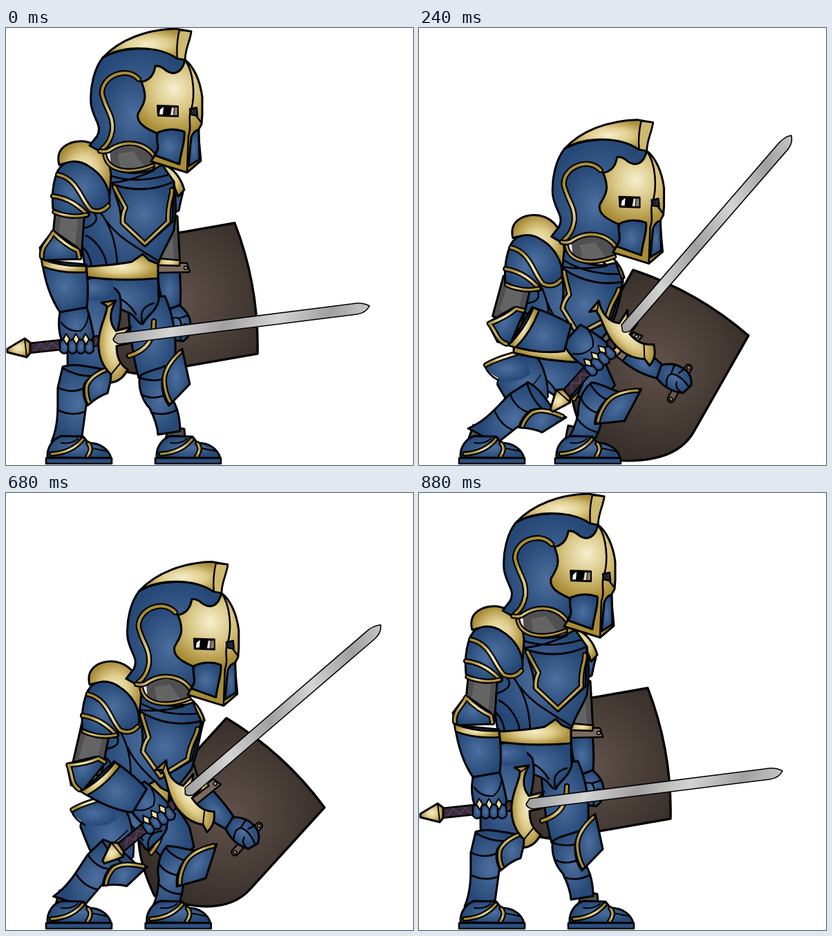
Write an HTML page that moves like this. It is 589 px wide and 632 px high and loops after 920 ms.

```html
<!DOCTYPE html>
<html lang="en">
<head>
<meta charset="utf-8">
<title>Crouching knight</title>
<style>
html, body { margin: 0; width: 100%; height: 100%; overflow: hidden; background: #fff; }
svg { display: block; width: 100vw; height: 100vh; }
path, circle { stroke-linejoin: round; stroke-linecap: round; }
</style>
</head>
<body>
<svg id="stage" viewBox="0 0 589 632">
  <defs>
    <radialGradient id="blue"><stop offset="0" stop-color="#4d6f9f"/><stop offset="1" stop-color="#264876"/></radialGradient>
    <radialGradient id="gold"><stop offset="0" stop-color="#f6eecb"/><stop offset=".5" stop-color="#dfcd8c"/><stop offset="1" stop-color="#a98c38"/></radialGradient>
    <radialGradient id="face" gradientUnits="userSpaceOnUse" cx="243" cy="88" r="64"><stop offset="0" stop-color="#f6efcd"/><stop offset=".5" stop-color="#d9c684"/><stop offset="1" stop-color="#a98c36"/></radialGradient>
    <radialGradient id="wood" gradientUnits="userSpaceOnUse" cx="96" cy="100" r="150"><stop offset="0" stop-color="#60524a"/><stop offset="1" stop-color="#352c28"/></radialGradient>
    <linearGradient id="steel" gradientUnits="userSpaceOnUse" x1="160" y1="450" x2="225" y2="474" spreadMethod="reflect"><stop offset="0" stop-color="#a0a0a0"/><stop offset="1" stop-color="#d4d4d4"/></linearGradient>
  </defs>
</svg>
<script>
const stage = document.getElementById('stage');
const BLUE = 'url(#blue)', GOLD = 'url(#gold)', GREY = '#646464', DARK = '#505050';

const fill = (d, paint, w = 3) => `<path d="${d}" fill="${paint}" stroke="#000" stroke-width="${w}"/>`;
const line = (d, w = 2.6, color = '#000') => `<path d="${d}" fill="none" stroke="${color}" stroke-width="${w}"/>`;
const trim = (d, w = 4) => line(d, w + 4.4) + line(d, w, GOLD);
const dot = (x, y, r, paint) => `<circle cx="${x}" cy="${y}" r="${r}" fill="${paint}" stroke="#000" stroke-width="1.5"/>`;

// Parts are drawn standing. In a full crouch a part has moved by (dx, dy),
// turned by `turn` about its pivot and shortened by `squash`.
// `lag` [dy, angle] holds a part back on the way down.
const parts = [];
function part(art, pivot, { dx = 0, dy = 0, turn = 0, squash = 0, lag = [0, 0] } = {}) {
  const g = document.createElementNS('http://www.w3.org/2000/svg', 'g');
  g.innerHTML = art;
  stage.append(g);
  parts.push({ g, pivot, dx, dy, turn, squash, lag });
}

// Shield, drawn with its top edge along x
const elbow = [236, 345], farArm = { dx: 65, dy: 124, turn: -52.9 };
part(`<g transform="translate(331 282) rotate(80.1)">
  ${fill('M0 0Q96-19 192 0L192 160Q192 220 96 260Q0 220 0 160Z', 'url(#wood)', 3.4)}</g>`, elbow, farArm);

// Far arm
part(fill('M222 270L248 272L252 345L222 345Z', DARK) + fill('M226 300L240 296L244 340L226 340Z', GREY, 0),
  [236, 300], { dx: 32, dy: 135, turn: -20 });
part(
  line('M222 443L273 434', 12) + line('M222 443L273 434', 7.5, '#66574f') +
  fill('M220 350L251 349C253 370 253 390 252 403L233 410C224 392 219 372 220 350Z', BLUE) +
  fill('M219 338L262 340L266 353L220 354Z', '#7b6a5f', 2.4) +
  fill('M219 333L252 336L251 344L219 343Z', GOLD, 2.4) +
  dot(260, 347, 2.5, '#aaa') + dot(273, 434, 2.2, '#aaa') + dot(222, 443, 2.2, '#aaa') +
  fill('M232 408L251 401C260 408 266 416 267 426C270 438 264 448 256 453L240 451C231 438 229 422 232 408Z', BLUE) +
  line('M233 426Q242 416 250 420Q258 430 252 452M250 420L262 416M240 451Q236 438 246 434M258 428L268 430', 2.4),
  elbow, farArm);

// Far shoulder
part(
  fill('M236 205L256 238L253 250L250 264L238 270Z', BLUE) +
  fill('M214 192C236 196 252 212 258 234L249 244C244 226 232 212 214 205Z', GOLD),
  [236, 220], { dx: 41, dy: 133 });

// Far leg
part(
  fill('M176 392L230 388C244 420 246 450 245 472L235 500L192 506C182 470 178 430 176 392Z', BLUE) +
  trim('M178 474C205 466 214 450 214 424'),
  [220, 500], { dx: 55, dy: 28, turn: -45 });

const boot =
  fill('M60 621C59 606 68 594 80 590L112 591L119 600C136 600 149 609 152 622Z', BLUE) +
  fill('M58 622L153 622L153 630L58 630Z', '#2d4f80', 2.6) +
  trim('M66 616C84 615 100 608 111 595', 3) + trim('M119 601Q126 608 118 619', 3) +
  line('M80 600Q95 602 104 594M126 608L146 612', 2);

part(fill('M235 575L258 580L260 602L230 600Z', DARK), [245, 595], { dx: -20 });
part(
  fill('M194 503C206 494 224 494 242 484L240 535C250 552 252 570 252 583L220 588C219 574 214 562 208 550C198 540 190 520 194 503Z', BLUE) +
  line('M196 530Q214 540 236 528M210 556Q230 562 248 552M194 506Q210 512 226 508') +
  fill('M255 464L266 515L236 546C228 536 225 522 226 510C227 494 240 478 255 464Z', BLUE) +
  trim('M252 469C238 482 229 496 229 510Q230 528 237 540', 3.4),
  [255, 464], { dx: 70, dy: 61, turn: 42 });
part(`<g transform="translate(158)">${boot}</g>`, [245, 595], { dx: -20 });

// Hips and near leg
const hips = { dx: 22, dy: 121, turn: 7 };
part(
  fill('M117 358L220 360L221 394C216 412 205 414 198 428C190 428 190 418 178 412L128 390Z', BLUE) +
  line('M198 428Q190 404 214 398M166 392Q180 400 188 414'),
  [165, 350], hips);
part(
  fill('M98 382C104 362 150 362 164 384C172 412 156 470 138 504L92 508C84 476 94 416 98 382Z', BLUE) +
  line('M100 448Q122 458 152 446'),
  [130, 385], { dx: 8, dy: 115, turn: -46, squash: .5 });
part(
  fill('M92 372C104 360 130 356 152 360L158 384C140 400 108 398 92 372Z', BLUE, 0) +
  line('M152 356C130 350 104 360 92 372Q98 386 112 393') + trim('M94 371C108 362 128 358 150 350', 3.4),
  [130, 372], { dx: 3, dy: 122 });
part(fill('M74 578L106 580L108 600L72 602Z', DARK), [92, 595], { turn: 15 });
part(
  fill('M82 490C98 484 122 490 142 494L116 546L110 590Q88 590 66 598C78 570 74 540 75 520Z', BLUE) +
  line('M75 520Q96 530 114 520M76 553Q96 562 114 555M82 492Q104 504 122 503') +
  fill('M157 488L147 528Q134 532 118 546C112 536 111 526 113 516C120 502 138 496 157 488Z', BLUE) +
  trim('M152 491C136 497 122 504 117 517Q115 530 120 541', 3.4),
  [92, 595], { turn: 46 });
part(boot, [92, 595]);

// Trunk and belt
part(
  fill('M146 196C168 214 200 214 226 198L243 222C247 250 246 272 243 292C236 310 226 322 220 342L115 347C108 320 108 288 112 250Z', BLUE) +
  line('M133 262C152 285 160 315 161 343M116 300C132 308 144 328 146 344M112 290Q138 282 128 268M146 280C160 300 180 312 219 336M112 318Q122 328 124 346') +
  fill('M154 226Q200 242 243 222L241 280L201 316L166 282C168 262 160 250 154 226Z', BLUE) +
  trim('M157 230C162 240 170 254 173 260Q168 270 169 282L201 312L235 280C233 254 241 245 240 234', 3.6) +
  line('M152 214Q190 226 236 212M150 224Q180 222 214 206'),
  [165, 350], { dx: 22, dy: 126, turn: 16 });
part(fill('M115 345Q158 343 182 338L198 327L207 336L220 341L220 362Q165 367 117 360Z', GOLD), [165, 350], hips);

// Near upper arm
part(
  fill('M72 258L114 260L109 332L66 318Z', DARK) + fill('M80 272L104 275L100 318L74 308Z', GREY, 0),
  [90, 290], { dx: 47, dy: 108, turn: 10 });

// Sword and the hand that holds it
const diamond = x => fill(`M${x} 442l5 8l-4 8l-5-8Z`, '#eee0a8', 2);
const finger = x => fill(`M${x} 453q6-5 12 0l1 13q-6 9-13 1Z`, BLUE, 2.4);
const each = (n, draw) => Array.from({ length: n }, (_, i) => draw(i)).join('');
part(
  fill('M33 456L136 445L138 459L34 470Z', '#3b2d33', 2.4) +
  line('M42 466L50 456L59 465L67 455L76 464L84 454L128 458L134 448', 2.4, '#4b3a68') +
  fill('M2 464L27 449L35 455L35 470L30 476L2 469Z', GOLD) + line('M27 449L30 476', 2) +
  fill('M138 397L159 394C149 412 150 427 159 438L181 432L172 442L178 456L160 460C160 478 166 487 176 494C170 506 162 512 151 513L152 501C138 488 133 470 134 452C136 428 147 414 146 402Z', GOLD) +
  line('M146 404Q150 402 159 394M152 501L166 484', 2) +
  fill('M160 442L500 399Q516 396 526 402Q521 412 508 414L164 457Q156 455 155 450Z', 'url(#steel)', 1.6) +
  fill('M79 406L116 402C121 416 125 434 127 446L121 460L84 460C76 444 75 424 79 406Z', BLUE) +
  line('M80 426Q90 440 108 438M108 438Q118 430 119 416', 2.2) +
  each(4, i => finger(78 + 12 * i)) + each(3, i => diamond(87 + 14 * i)),
  [160, 450], { dx: 145, dy: -24, turn: -46.9, lag: [29, 10] });

// Near forearm with elbow guard
part(
  fill('M68 293L104 318L108 334L54 336L49 318Z', BLUE) +
  trim('M52 331C50 316 62 310 68 296Q86 314 104 322L106 332', 3.6) +
  fill('M52 336L116 342C119 368 119 388 117 404L78 411C64 390 56 366 52 336Z', BLUE) +
  fill('M51 334Q82 346 116 344L116 353Q82 356 53 345Z', GOLD, 2.6),
  [84, 318], { dx: 46.7, dy: 109.4, turn: -68 });

// Near shoulder
part(
  fill('M75 206C68 222 66 240 68 262Q94 276 118 273L126 240Z', BLUE) +
  trim('M68 243C90 246 104 256 118 270', 3.6) + trim('M70 266Q94 276 117 270', 3) +
  fill('M77 198C70 172 94 162 114 164C138 168 150 188 152 212L150 242C136 208 108 186 77 198Z', GOLD) +
  fill('M74 211C78 192 102 188 120 200C140 212 150 232 150 248C150 262 138 269 123 265C112 240 100 218 74 211Z', BLUE) +
  trim('M75 212C104 218 108 248 123 263Q138 269 148 257', 3.6),
  [112, 215], { dx: 61, dy: 112, turn: 2 });

// Neck and helmet
part(
  fill('M150 178Q185 160 218 186L214 200Q182 212 152 200Z', DARK, 0) +
  fill('M162 182L184 178L200 200L166 204Z', GREY, 0) +
  trim('M143 184C148 208 180 212 212 199', 2.8) +
  fill('M140 43C128 58 121 85 123 110C126 132 140 140 132 156L121 170L135 178L148 180C166 162 200 160 214 188L262 206L268 100L258 46C225 24 170 26 140 43Z', BLUE) +
  fill('M196 78C176 52 136 70 138 94C143 118 156 126 153 148Q150 168 140 177L150 179C172 160 200 162 214 186L232 150L212 76Z', BLUE) +
  trim('M192 74C174 54 138 70 139 95C144 118 156 126 154 148Q151 166 139 175') +
  trim('M136 178Q146 180 152 175C172 162 200 164 215 186', 3.4) +
  fill('M140 43C165 16 205 2 245 1L268 5C266 20 259 30 259 46L247 44C222 26 170 24 140 43Z', GOLD) +
  fill('M251 3L268 5C266 20 259 30 259 46L248 44Q246 24 251 3Z', '#cdb970', 2.4) +
  fill('M259 46C272 56 281 76 284 100V126L283 139L278 148L282 192L262 209L210 193L220 176L218 152C204 146 188 138 191 124C197 112 207 104 196 78C206 76 214 70 216 55Q224 54 231 61C244 70 255 64 259 46Z', 'url(#face)') +
  fill('M220 151Q240 143 258 150C260 162 253 178 251 197L215 184C226 172 214 160 220 151Z', BLUE) +
  fill('M268 158Q272 148 279 147L280 190L264 200Z', BLUE) +
  line('M259 46C272 64 274 98 268 118C262 132 270 142 264 156L262 209M276 128L283 137') +
  fill('M219 112L249 113L249 128L220 127Z', '#000', 2) +
  fill('M222 125L223 118L228 114L227 125Z', '#fff', 0) + fill('M240 115L243 115L242 126L238 126Z', '#ddd', 0) +
  fill('M244 115H248V126H243Z', '#8c7b73', 0) +
  fill('M266 117L276 115L277 127L267 125Z', '#1b2c48', 2.4) + dot(270, 120, 1.4, '#fff'),
  [200, 110], { dx: 74, dy: 138 });

const LOOP = 920, STEP = 40, DOWN = 320, UP = 600, STAND = 880;
const clamp = x => Math.max(0, Math.min(1, x));

function draw(now) {
  const t = Math.floor(now % LOOP / STEP) * STEP;
  const falling = t < DOWN;
  // Drop quickly and settle, then rise at an even pace
  const p = falling ? (1 - (1 - t / DOWN) ** 3) ** 3 : clamp((STAND - t) / (STAND - UP));
  const hold = falling ? 6.75 * p * p * (1 - p) : 0;
  for (const { g, pivot: [x, y], dx, dy, turn, squash, lag } of parts) {
    g.setAttribute('transform',
      `translate(${x + dx * p} ${y + dy * p + lag[0] * hold}) rotate(${turn * p + lag[1] * hold}) ` +
      `scale(1 ${1 - squash * p}) translate(${-x} ${-y})`);
  }
}

const start = performance.now();
function tick() {
  draw(performance.now() - start);
  requestAnimationFrame(tick);
}
tick();
</script>
</body>
</html>
```
